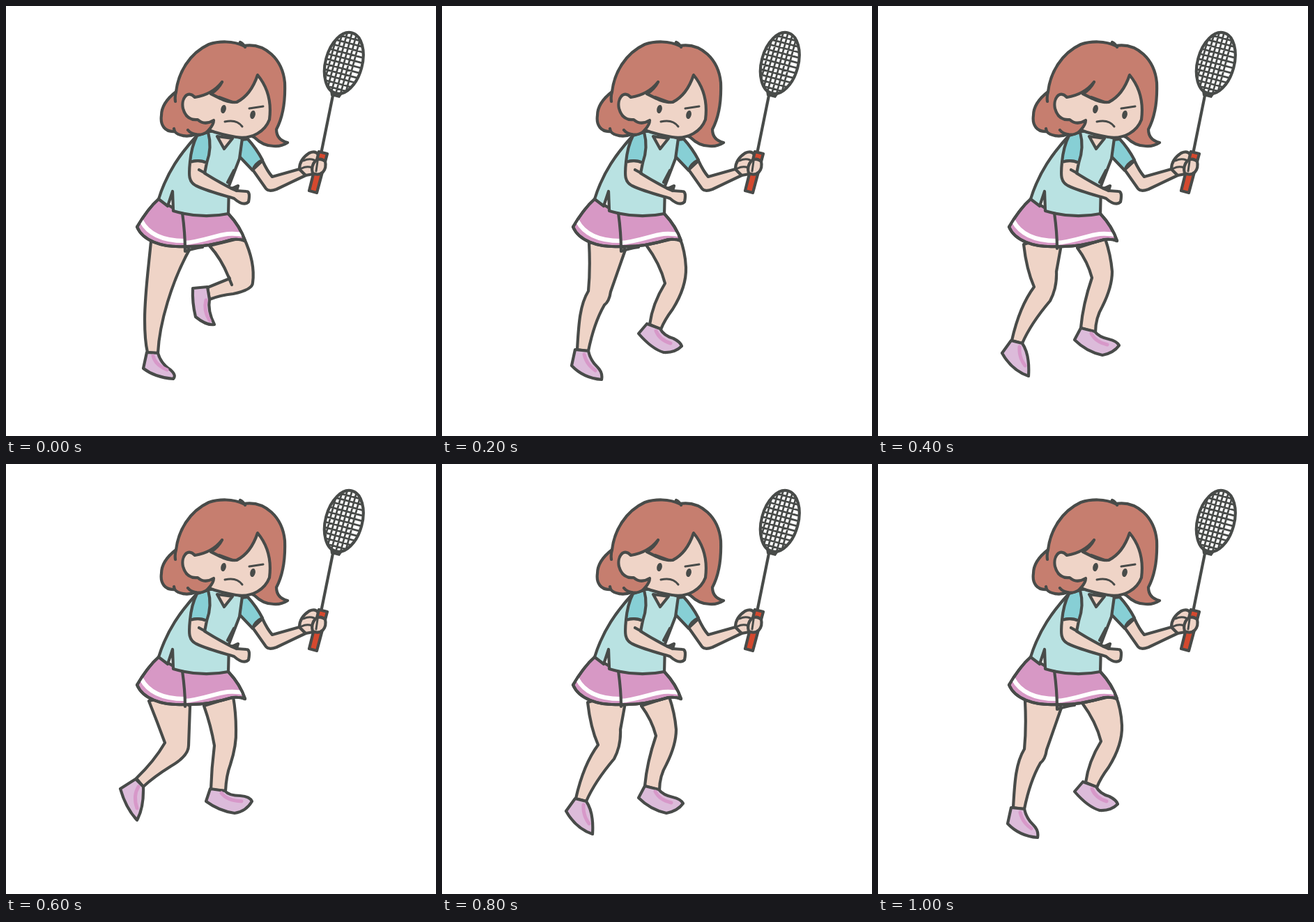
An HTML page for the animation above (1200 ms loop, 617x617 px).

```html
<!DOCTYPE html>
<html lang="en">
<head>
<meta charset="utf-8">
<title>Badminton player</title>
<style>
  html, body { margin: 0; width: 100%; height: 100%; overflow: hidden; background: #fff; }
  svg { display: block; width: 100%; height: 100%; }
  path, ellipse { stroke: #484b49; stroke-width: 4.2; stroke-linecap: round; stroke-linejoin: round; }
  .line { fill: none; }
  .thin { fill: none; stroke-width: 3; }
  .skin { fill: #efd4c7; }
  .hair { fill: #c67e6f; }
  .shirt { fill: #b9e2e2; }
  .sleeve { fill: #87cfd5; }
  .skirt { fill: #d798c5; }
  .shoe { fill: #dcbbda; }
  .grip { fill: #d4492f; }
  .accent { fill: none; stroke: #d798c9; stroke-width: 5; }
  .stripe { fill: none; stroke: #fff; stroke-width: 6; stroke-linecap: butt; }
  .dark { fill: #484b49; stroke: none; }
  .string { fill: none; stroke-width: 2.7; }
</style>
</head>
<body>
<svg viewBox="0 0 617 617">
  <defs>
    <clipPath id="skirtClip">
      <path d="M219 277Q204 290 188 317C196 336 222 347 257 345C278 346 302 342 325 335Q336 334 343 337Q336 316 319 298Z"/>
    </clipPath>
  </defs>

  <g id="legs">
    <path id="legR" class="skin"/>
    <path id="legL" class="skin"/>
    <path id="shoeR" class="shoe"/>
    <path id="accentR" class="accent"/>
    <path id="shoeL" class="shoe"/>
    <path id="accentL" class="accent"/>
  </g>

  <g id="skirt">
    <path class="skirt" d="M219 277Q204 290 188 317C196 336 222 347 257 345C278 346 302 342 325 335Q336 334 343 337Q336 316 319 298L240 290Z"/>
    <path class="stripe" clip-path="url(#skirtClip)" d="M194 308C205 329 228 337 256 337M256 340C282 338 300 329 318 327Q331 326 344 329"/>
    <path class="line" d="M219 277Q204 290 188 317C196 336 222 347 257 345C278 346 302 342 325 335Q336 334 343 337Q336 316 319 298"/>
    <path id="slit" class="line"/>
  </g>

  <g id="rightArm">
    <path class="skin" d="M354 235L373 262Q377 267 388 263L430 243L421 234L382 245Q375 237 368 222Z"/>
    <path class="sleeve" d="M338 192L347 191Q359 204 368 221Q357 226 354 236L335 216Z"/>
  </g>

  <g id="torso">
    <path class="shirt" d="M273 187C251 211 231 238 219 277L232 287L239 266L240 294Q280 306 319 298L320 258L335 219L339 190L310 180L290 180Z"/>
    <path class="line" d="M327 236L318 253"/>
    <path class="skin" d="M303 187L313 205L325 190Z"/>
    <path class="sleeve" d="M274 186Q266 202 264 224Q277 220 288 225Q296 203 290 181Z"/>
    <path class="skin" d="M264 224C262 243 262 253 273 258C290 266 310 271 327 276C335 283 343 286 348 281Q351 266 345 266L331 265L333 258L324 262Q304 252 285 240L288 225Q277 220 264 224Z"/>
    <path class="line" d="M277 235L286 240M324 262L331 265"/>
  </g>

  <g id="head">
    <path class="hair" d="M244 123C231 133 223 145 223 157C221 171 228 181 242 180C247 186 260 189 272 184C279 186 287 183 291 178L320 170L357 189C365 197 374 201 384 201Q395 202 404 196Q388 192 388 177C397 160 401 137 400 110C397 77 372 52 341 57C326 50 306 50 291 55C263 68 247 96 244 123Z"/>
    <path class="line" d="M244 123Q242 130 243 137M336 52Q340 54 343 59M242 180L241 176M272 184Q265 183 261 178"/>
    <path class="skin" d="M271 131C260 119 251 134 254 147C257 158 264 164 275 163Q285 172 298 164Q298 170 291 178C304 183 318 186 330 188C354 192 372 179 378 163C381 140 376 117 361 99C355 117 345 131 331 138Q319 139 308 133L294 126Q305 119 310 109Q296 127 271 131Z"/>
    <path class="line" d="M306 131L325 138"/>
    <path class="thin" d="M349 147L369 144M314 166Q331 162 339 173"/>
    <ellipse class="dark" cx="312" cy="148" rx="3.7" ry="6.2" transform="rotate(14 312 148)"/>
    <ellipse class="dark" cx="354" cy="156" rx="3.7" ry="6.2" transform="rotate(14 354 156)"/>
  </g>

  <g id="racket">
    <path class="line" d="M469.5 126L452 212"/>
    <g transform="translate(484.8 82) rotate(15)">
      <path id="strings" class="string"/>
      <ellipse class="line" rx="26.3" ry="45"/>
      <path class="dark" d="M-10 41Q0 44 10 41L7 50H-6Z"/>
    </g>
    <path class="skin" d="M421 234Q421 220 435 211Q444 207 448 213L447 240L430 243Z"/>
    <path class="grip" d="M449 209L461 212L446 268L435 265Z"/>
    <path class="skin" d="M444 222Q451 217 458 223Q460 232 455 238Q449 244 440 240Q437 230 444 222Z"/>
    <path class="thin" d="M427 222Q435 218 442 221M424 233Q432 229 439 232M447 223L445 237"/>
  </g>
</svg>

<script>
const longSlit = "M253 297Q257 325 257 352Q268 348 282 346";
const shortSlit = "M253 297Q257 325 257 348";

const poses = [
  {
    legL: "M208 338C204 380 199 415 199 450Q199 480 203 497L218 498C220 455 238 395 263 350L250 330Z",
    legR: "M292 344Q309 363 319 388L321 391Q306 397 289 404L292 421Q307 415 326 413Q354 407 354 397Q358 368 341 332ZM319 388L324 400",
    shoeL: "M202 497L197 520Q214 533 240 535Q245 530 236 522Q222 513 218 498Z",
    shoeR: "M268 405L289 403L292 421Q289 437 299 457Q288 459 272 446Q267 426 268 405Z",
    accentL: "M211 502Q214 515 231 522",
    accentR: "M287 422Q283 437 292 451",
    slit: longSlit
  },
  {
    legL: "M211 340Q213 378 210 409C197 430 196 460 194 493L210 495Q218 455 233 429Q240 424 242 410L263 350L250 330Z",
    legR: "M293 343Q313 370 320 398Q302 427 298 457L314 464Q319 451 331 435Q351 403 350 375Q349 352 341 332Z",
    shoeL: "M191 493L210 495Q213 509 223 518Q231 526 229 536Q203 534 186 516Z",
    shoeR: "M294 456L313 463Q318 473 332 477Q342 482 344 488Q334 498 318 497Q301 492 282 470Z",
    accentL: "M204 500Q207 514 220 523",
    accentR: "M307 466Q312 479 328 484",
    slit: longSlit
  },
  {
    legL: "M209 342Q213 378 224 403Q203 431 192 480L207 484Q219 456 247 423Q257 404 256 381L262 348L250 330Z",
    legR: "M286 347Q301 367 307 390Q294 428 291 462L312 468Q312 448 322 431Q336 403 336 381Q334 357 326 334Z",
    shoeL: "M191 480L207 484Q218 500 216 531Q192 523 178 498Z",
    shoeR: "M291 462L311 467Q317 475 331 478Q343 481 346 487Q338 498 322 501Q299 496 282 479Z",
    accentL: "M203 489Q202 504 211 516",
    accentR: "M306 470Q312 482 329 486",
    slit: shortSlit
  },
  {
    legL: "M205 340Q217 370 228 400Q213 426 187 451L197 463Q212 449 236 434Q262 419 262 404L264 348L250 330Z",
    legR: "M284 347Q294 375 299 404Q295 436 294 467L315 469Q316 447 322 431Q331 403 330 381Q330 357 326 334Z",
    shoeL: "M186 452L197 463Q198 493 188 511Q172 494 164 466Z",
    shoeR: "M293 466L314 469Q320 476 336 476Q350 477 353 484Q344 499 328 501Q306 498 287 484Z",
    accentL: "M190 463Q182 476 188 494",
    accentR: "M309 472Q317 483 338 484",
    slit: shortSlit
  }
];
const order = [0, 1, 2, 3, 2, 1];
const hold = 200;
const byId = id => document.getElementById(id);

function stringPath(rx, ry) {
  let d = "";
  for (let x = -20; x <= 20; x += 6.7) {
    const y = ry * Math.sqrt(1 - (x / rx) ** 2);
    d += `M${x} ${-y}V${y}`;
  }
  for (let y = -37; y <= 38; y += 7.5) {
    const x = rx * Math.sqrt(1 - (y / ry) ** 2);
    d += `M${-x} ${y}H${x}`;
  }
  return d;
}

function render(time) {
  const step = Math.floor(time / hold) % order.length;
  const pose = poses[order[step]];
  for (const part in pose) byId(part).setAttribute("d", pose[part]);
}

function loop(now) {
  render(Math.max(0, now));
  requestAnimationFrame(loop);
}

byId("strings").setAttribute("d", stringPath(26.3, 45));
render(0);
requestAnimationFrame(loop);
</script>
</body>
</html>
```
